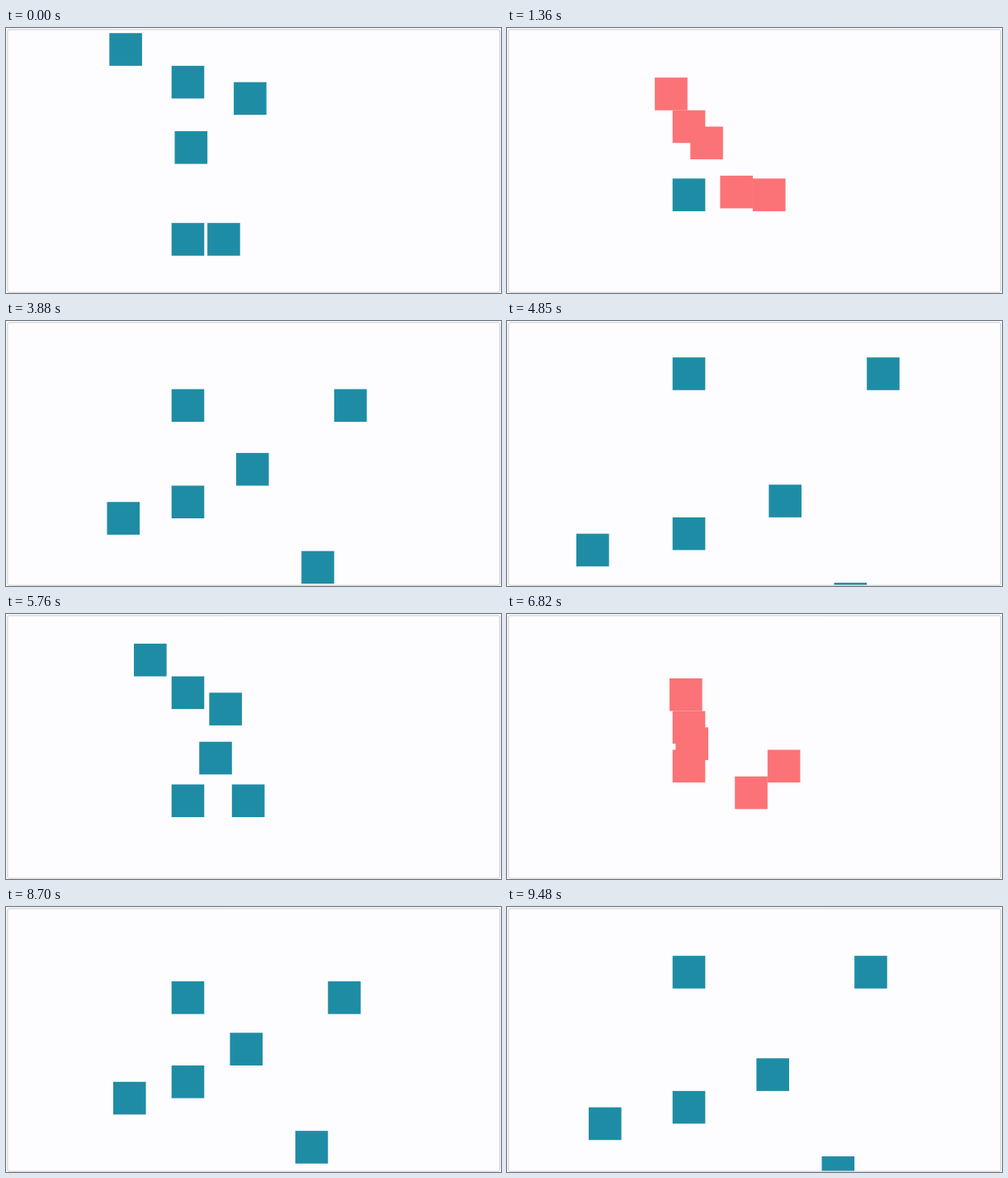
Recreate the animation shown at these times as an HTML page with a canvas. Size 600x321 px, loop 9.51 s.

```html
<!DOCTYPE html>
<html lang="en">
<head>
<meta charset="utf-8">
<style>
  html, body { margin: 0; width: 100%; height: 100%; overflow: hidden; background: #fdfcfe; }
  canvas { display: block; }
</style>
</head>
<body>
<canvas id="stage" width="600" height="321"></canvas>
<script>
const ctx = document.getElementById('stage').getContext('2d');
const LOOP = 9510;
const RESTART = 4910;   // the squares jump back to their starting places
const SCALE = 0.99;
const SIZE = 40;
const SPEED = 0.04;     // units per ms

// Start cell on a 20-unit grid and direction of travel.
const squares = [
  { col: 6,  row: 0,  dx: 1,  dy: 1 },
  { col: 10, row: 2,  dx: 0,  dy: 1 },
  { col: 14, row: 3,  dx: -1, dy: 1 },
  { col: 10, row: 6,  dx: 1,  dy: 1 },
  { col: 10, row: 12, dx: 0,  dy: -1 },
  { col: 12, row: 12, dx: 1,  dy: -1 },
];

// Squares that only share an edge count as touching.
const touches = (a, b) =>
  Math.max(Math.abs(a.x - b.x), Math.abs(a.y - b.y)) <= SIZE + 0.01;

function draw(t) {
  const travel = SPEED * (t < RESTART ? t + 95 : t - RESTART - 4);
  const placed = squares.map(s => ({
    x: s.col * 20 + s.dx * travel,
    y: s.row * 20 + s.dy * travel,
  }));

  ctx.fillStyle = '#fdfcfe';
  ctx.fillRect(0, 0, 600, 321);

  ctx.save();
  ctx.beginPath();
  ctx.rect(2, 2, 596, 317.8);
  ctx.clip();
  ctx.translate(2.7, 2.4);
  ctx.scale(SCALE, SCALE);
  for (const a of placed) {
    const hit = placed.some(b => b !== a && touches(a, b));
    ctx.fillStyle = hit ? '#fb7376' : '#1f8ca5';
    ctx.fillRect(a.x, a.y, SIZE, SIZE);
  }
  ctx.restore();

  ctx.strokeStyle = '#ccc';
  ctx.lineWidth = 1;
  ctx.beginPath();
  ctx.roundRect(1.9, 1.9, 596.5, 318.3, 2);
  ctx.stroke();
}

const start = performance.now();
function tick() {
  draw((performance.now() - start) % LOOP);
  requestAnimationFrame(tick);
}
tick();
</script>
</body>
</html>
```
